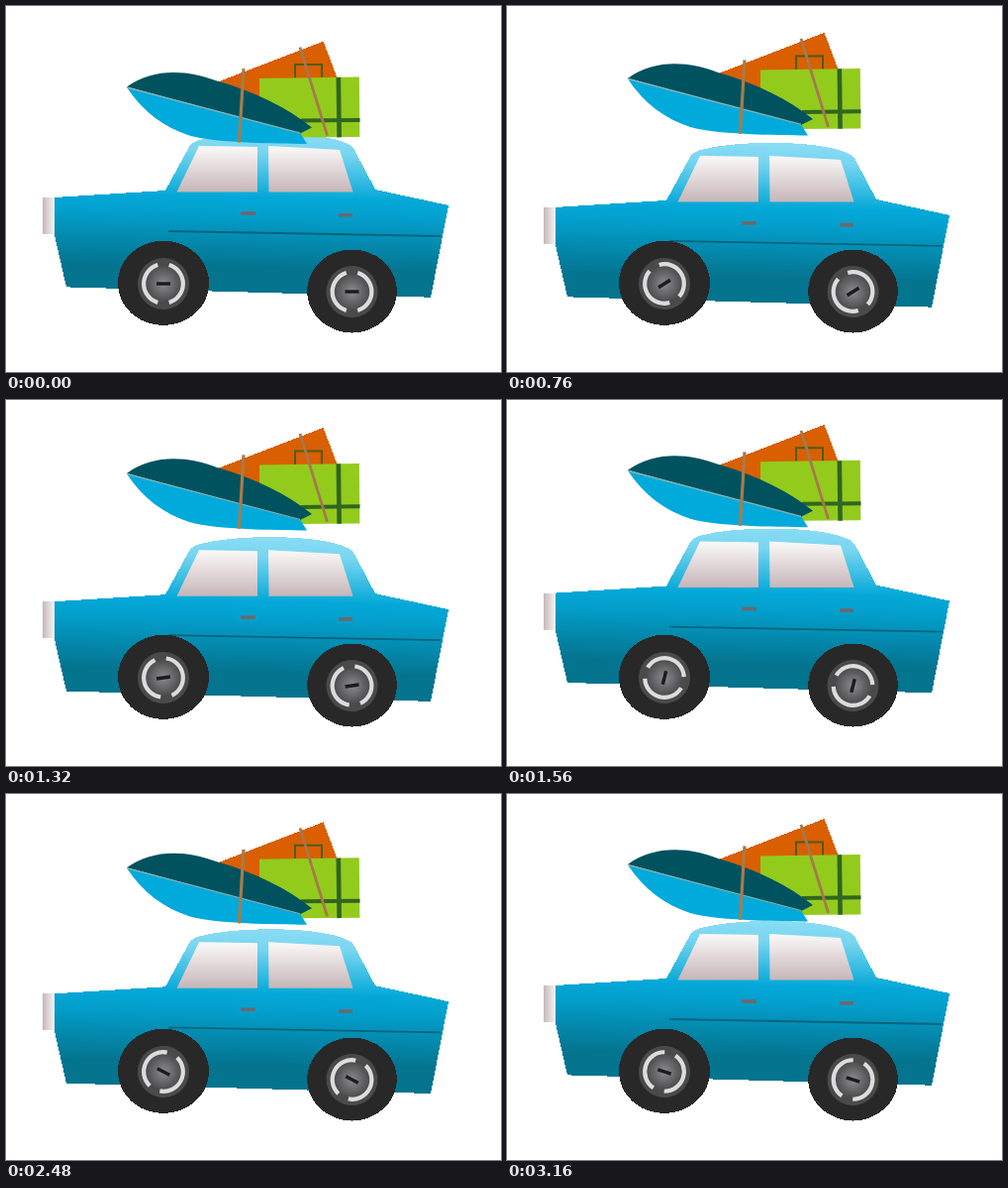
An HTML page that plays this animation: 500x369 px, repeating every 3.2 s.

```html
<!DOCTYPE html>
<html lang="en">
<head>
<meta charset="utf-8">
<title>Road trip</title>
<style>
html, body { margin: 0; width: 100%; height: 100%; overflow: hidden; background: #fff; }
svg { display: block; width: 100%; height: 100%; }
.crisp { shape-rendering: crispEdges; }
</style>
</head>
<body>
<svg viewBox="0 0 500 369">
  <defs>
    <linearGradient id="paint" gradientUnits="userSpaceOnUse" x1="255" y1="128" x2="251" y2="290">
      <stop offset="0" stop-color="#8adcf4"/>
      <stop offset=".12" stop-color="#78d5f0"/>
      <stop offset=".4" stop-color="#04a8d8"/>
      <stop offset=".5" stop-color="#03a0ce"/>
      <stop offset=".84" stop-color="#04748f"/>
    </linearGradient>
    <linearGradient id="glass" x1="0" y1="0" x2="0" y2="1">
      <stop offset="0" stop-color="#fbf9f9"/>
      <stop offset="1" stop-color="#c6b6b8"/>
    </linearGradient>
    <linearGradient id="lamp">
      <stop offset="0" stop-color="#c6b7b9"/>
      <stop offset="1" stop-color="#fbf9f9"/>
    </linearGradient>
    <radialGradient id="metal">
      <stop offset="0" stop-color="#8c8c8e"/>
      <stop offset="1" stop-color="#4c4c4e"/>
    </radialGradient>
    <g id="hub">
      <circle r="26" fill="#4a4a4b"/>
      <circle r="18" fill="url(#metal)"/>
      <g fill="none" stroke="#dcdcdc" stroke-width="4.2">
        <path d="M-5.7-18.9A19.7 19.7 0 0 0-5.7 18.9"/>
        <path d="M5.7-18.9A19.7 19.7 0 0 1 5.7 18.9"/>
      </g>
      <path d="M-7 0H7" stroke="#1c1c1c" stroke-width="3.4"/>
    </g>
  </defs>

  <g id="car">
    <rect class="crisp" x="37" y="193" width="13" height="37" fill="url(#lamp)"/>
    <path class="crisp" fill="url(#paint)" d="M49 193L161 186L185 142Q188 137 196 135C232 125 318 125 345 139Q350 141 353 147L373 185L447 201L429 293.7L61 283.4L49 231Z"/>
    <path fill="url(#glass)" d="M195 141L254 142V187.5H172.5Z"/>
    <path fill="url(#glass)" d="M265 141L337 145L350.5 187.5H265.5Z"/>
    <path d="M164 227L439 232" stroke="#07647d" stroke-width="1.8"/>
    <path d="M237 209H252M336 210.7H350" stroke="#6d676c" stroke-width="3.6"/>
  </g>

  <g class="crisp" fill="#282828">
    <ellipse cx="159" cy="279.3" rx="46" ry="42.7"/>
    <ellipse cx="349.5" cy="287.5" rx="45.3" ry="42"/>
  </g>
  <g transform="translate(159 280)"><use class="hub" href="#hub"/></g>
  <g transform="translate(349.5 288)"><use class="hub" href="#hub"/></g>

  <g id="load">
    <path class="crisp" fill="#d95f00" d="M320.5 25L334.5 62V75L300 105L230 100L212 66.7Z"/>
    <path d="M292 62V48.5H319V62" fill="none" stroke="#4b5d18" stroke-width="2"/>
    <path fill="#93cb1c" d="M256 62.5L356.8 61L357.3 121.5L290 122L256 100Z"/>
    <g stroke="#2f6620">
      <path d="M335.8 61.3L336.6 121.8" stroke-width="4.6"/>
      <path d="M298 105L357.5 104.3" stroke-width="4"/>
    </g>
    <path d="M297 31L324.5 120" stroke="#a6784e" stroke-width="2.8"/>
    <path fill="#00aadb" d="M122 71.5L297 117.5L304 128.5C270 128 215 128 185 120C160 112 138 96 122 71.5Z"/>
    <path fill="#00525f" d="M122 71C148 52 182 53 213 65C252 76 284 92 309 112L297 118Z"/>
    <path d="M122 71.5L297 117.5" stroke="#8fb4b4" stroke-width="1.1"/>
    <path d="M240 52.5L235.5 127" stroke="#a67c4c" stroke-width="3.2"/>
  </g>
</svg>
<script>
const STEP = 40, COUNT = 80;
const TURN = -11.17; // wheel degrees per step

// Steps at which each bounce begins
const CAR_BEATS = [0, 13.2, 27, 39.5, 52.4, 65.8, 79, 92];
const LOAD_BEATS = [0, 15.2, 29.2, 46.2, 59, 73.4, 87];

const car = document.getElementById("car");
const load = document.getElementById("load");
const hubs = document.querySelectorAll(".hub");

// Parabolic arc: 0 at each beat, 1 halfway to the next
function arc(beats, n) {
  let i = 0;
  while (n >= beats[i + 1]) i++;
  const p = (n - beats[i]) / (beats[i + 1] - beats[i]);
  return 4 * p * (1 - p);
}

function shift(el, y) {
  el.setAttribute("transform", `translate(0 ${y.toFixed(2)})`);
}

const start = performance.now();

function draw() {
  const n = Math.floor((performance.now() - start) / STEP) % COUNT;
  shift(car, 10.2 * arc(CAR_BEATS, n));
  shift(load, 10.6 - 11 * arc(LOAD_BEATS, n));
  hubs.forEach(h => h.setAttribute("transform", `rotate(${TURN * n})`));
  requestAnimationFrame(draw);
}
draw();
</script>
</body>
</html>
```
